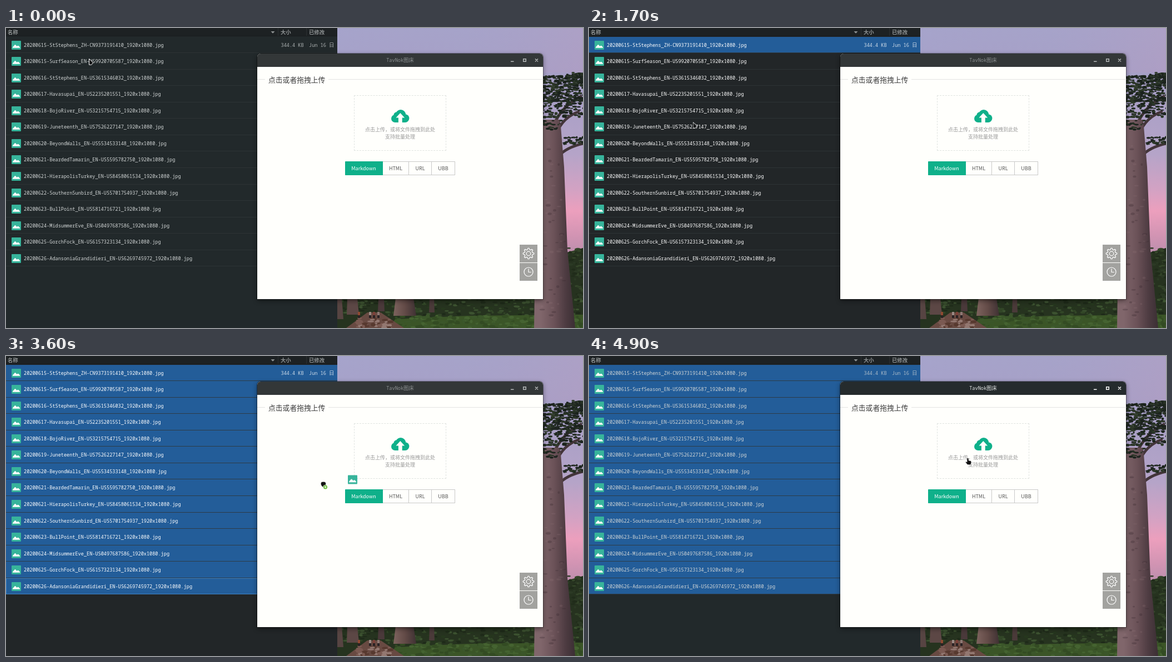
These frames come from a looping animation (1038x540 px, 8000 ms). An HTML page with a canvas:

```html
<!DOCTYPE html>
<html lang="zh-CN">
<head>
<meta charset="utf-8">
<title>拖拽上传</title>
<style>
  :root {
    --mono: 8.57px "Noto Sans Mono", "Noto Sans CJK SC", monospace;
    --green: #0fb08a;
  }
  html, body { margin: 0; width: 100%; height: 100%; overflow: hidden; background: #22292b; }
  #stage { position: relative; width: 1038px; height: 540px; overflow: hidden; }
  #stage * { box-sizing: border-box; }
  #stage canvas, #stage svg, .abs { position: absolute; left: 0; top: 0; white-space: pre; }
  .anim, .row { animation: 8s step-end -8ms infinite; }
  .han { font-size: 9.35px; line-height: 0; }

  /* file list */
  #list {
    width: 596px; height: 540px; overflow: hidden;
    font: var(--mono);
    animation-name: list-focus;
  }
  #head {
    width: 596px; height: 15px;
    background: #1d2123; color: #909495;
    font: 700 9.35px/14px "Noto Sans CJK SC", sans-serif;
    border-bottom: 1px solid #191c1e;
  }
  .rule { width: 1px; height: 14px; background: #2b2f31; }
  .row {
    position: absolute; left: 0; width: 596px; height: 29.57px; line-height: 31px; white-space: pre;
    border-bottom: 1px solid rgba(48, 54, 56, .85);
    animation-name: select-rest;
  }
  .row:nth-child(2) { animation-name: select-first; }
  .row svg { left: 10px !important; top: 7px !important; }
  .dim { opacity: .78; }
  #ring {
    top: 400px; width: 596px; height: 29px;
    border: 1px solid #3f83c4; animation-name: ring;
  }

  /* upload window */
  #win {
    left: 452px; top: 46px; width: 514px; height: 442px;
    background: #fffffc; border-radius: 6px 6px 0 0;
    box-shadow: 0 0 0 1px rgba(0,0,0,.35), 0 3px 9px rgba(0,0,0,.45);
    font: 9px "Noto Sans CJK SC", "Noto Sans", sans-serif;
  }
  #bar {
    width: 514px; height: 24px; text-align: center;
    border-radius: 6px 6px 0 0;
    font: var(--mono); line-height: 25px;
    animation-name: bar-focus;
  }
  #controls { animation-name: controls-focus; }
  #legend { left: 20px; top: 36.6px; font-size: 12.8px; line-height: 20px; font-weight: 300; color: #3c3c3c; }
  #drop {
    left: 174px; top: 75px; width: 166px; height: 100px; padding-top: 54px;
    border: 1px dashed #dfe3df; color: #999; text-align: center; line-height: 13px;
  }
  #tabs { left: 158px; top: 194px; display: flex; line-height: 23px; color: #555; text-align: center; }
  #tabs span { height: 25px; border: 1px solid #c9c9c9; border-left: 0; }
  #tabs .on { background: var(--green); border-color: var(--green); color: #fff; border-radius: 1px 0 0 1px; }
  #tabs span:last-child { border-radius: 0 1px 1px 0; }

  /* pointers */
  #arrow { animation-name: arrow; }
  #fist { animation-name: fist; }
  #file { animation-name: file; }
  #badge { animation-name: badge; }
  #plus { animation-name: plus; }
  #finger { animation-name: finger; }

  @keyframes list-focus {
    0% { background-color: #22292b; color: #d3d7d7; }
    10% { background-color: #222628; color: #fff; }
    57.5% { background-color: #222628; color: #fff; animation-timing-function: steps(3); }
    61.25%, 100% { background-color: #22292b; color: #d3d7d7; }
  }
  @keyframes bar-focus {
    0% { background-color: #333738; color: #8d9192; }
    57.5% { background-color: #333738; color: #8d9192; animation-timing-function: steps(3); }
    61.25%, 100% { background-color: #252b2d; color: #e6e8e8; }
  }
  @keyframes controls-focus {
    0% { color: #b6b9b9; }
    57.5% { color: #b6b9b9; animation-timing-function: steps(3); }
    61.25%, 100% { color: #fff; }
  }
  @keyframes select-first { 0% { background-color: transparent; } 10%, 100% { background-color: #235d99; } }
  @keyframes select-rest { 0% { background-color: transparent; } 33.75%, 100% { background-color: #235d99; } }
  @keyframes ring { 0% { opacity: 0; } 37.5% { opacity: 1; } 57.5%, 100% { opacity: 0; } }

  @keyframes arrow {
    0% { transform: translate(149px, 55px); opacity: 1; }
    2.5% { transform: translate(149px, 55px); animation-timing-function: steps(3); }
    6.25% { transform: translate(139px, 38px); }
    13.75% { transform: translate(139px, 38px); animation-timing-function: steps(4); }
    18.75% { transform: translate(185px, 109px); }
    20% { transform: translate(185px, 109px); animation-timing-function: steps(2); }
    22.5% { transform: translate(188px, 229px); }
    23.75% { transform: translate(188px, 229px); animation-timing-function: steps(7); }
    32.5% { transform: translate(181px, 420px); opacity: 1; }
    37.5%, 100% { transform: translate(181px, 420px); opacity: 0; }
  }
  @keyframes fist {
    0% { transform: translate(178px, 418px); opacity: 0; }
    37.5% { transform: translate(178px, 418px); opacity: 1; }
    38.75% { transform: translate(186px, 432px); }
    40% { transform: translate(225px, 430px); }
    41.25% { transform: translate(310px, 390px); }
    42.5% { transform: translate(410px, 330px); }
    43.75% { transform: translate(500px, 270px); }
    45% { transform: translate(566px, 226px); }
    46.25% { transform: translate(606px, 207px); }
    47.5% { transform: translate(632px, 197px); }
    48.75% { transform: translate(648px, 189px); }
    50% { transform: translate(660px, 185px); }
    52.5% { transform: translate(677px, 181px); opacity: 1; }
    57.5%, 100% { transform: translate(677px, 181px); opacity: 0; }
  }
  @keyframes file {
    0% { transform: translate(200px, 436px); opacity: 0; }
    38.75% { transform: translate(230px, 440px); opacity: 1; }
    40% { transform: translate(315px, 400px); }
    41.25% { transform: translate(415px, 345px); }
    42.5% { transform: translate(505px, 285px); }
    43.75% { transform: translate(570px, 240px); }
    45% { transform: translate(615px, 214.5px); }
    46.25% { transform: translate(636px, 205px); }
    47.5% { transform: translate(648px, 198px); }
    48.75% { transform: translate(660px, 194px); }
    50% { transform: translate(670px, 192px); }
    52.5% { transform: translate(682px, 188px); opacity: 1; }
    57.5%, 100% { transform: translate(682px, 188px); opacity: 0; }
  }
  @keyframes badge { 0% { opacity: 1; } 47.5%, 100% { opacity: 0; } }
  @keyframes plus { 0% { opacity: 0; } 47.5%, 100% { opacity: 1; } }
  @keyframes finger { 0% { opacity: 0; } 57.5%, 100% { opacity: 1; } }
</style>
</head>
<body>
<div id="stage">
  <canvas id="photo" width="1038" height="540"></canvas>

  <div id="list" class="abs anim">
    <div id="head" class="abs">
      <span class="abs" style="left:3px">名称</span>
      <span class="abs" style="left:494px">大小</span>
      <span class="abs" style="left:545px">已修改</span>
      <i class="abs rule" style="left:489px"></i>
      <i class="abs rule" style="left:540px"></i>
      <svg width="490" height="14"><path d="M476.5 6h7l-3.5 3.7z" fill="#909495"/></svg>
    </div>
  </div>
  <div id="ring" class="abs anim"></div>

  <div id="win" class="abs">
    <div id="bar" class="abs anim">TavNok<span class="han">图床</span></div>
    <div id="legend" class="abs">点击或者拖拽上传</div>
    <div id="drop" class="abs">点击上传，或将文件拖拽到此处
支持批量处理</div>
    <div id="tabs" class="abs"><span class="on" style="width:68px">Markdown</span><span style="width:47px">HTML</span><span style="width:41px">URL</span><span style="width:42px">UBB</span></div>
  </div>

  <svg width="1038" height="540" fill="none">
    <defs>
      <g id="image">
        <rect width="17" height="16" rx="1" fill="#37b49b"/>
        <path d="M2 12.8V11.5L5.6 7.4Q6.5 6.4 7.4 7.4L9.6 10 10.8 9Q11.6 8.4 12.4 9L15 11.6V12.8z" fill="#fff"/>
      </g>
    </defs>
    <path d="M452 92.5h14M580 92.5h386" stroke="#e4e4e2"/>
    <g id="controls" class="anim" stroke="currentColor" stroke-width="1.4">
      <path d="M908 60.3h5.5M930.7 55.7h4.6v4.6h-4.6zM952 55.5l5 5m0-5l-5 5"/>
    </g>
    <g transform="translate(693 147)">
      <g fill="#0fb08a">
        <circle cx="7" cy="16" r="7"/>
        <circle cx="9.5" cy="9.5" r="5"/>
        <circle cx="17" cy="9.2" r="9.2"/>
        <circle cx="25" cy="15.6" r="7.4"/>
        <path d="M7 12h18v11H7z"/>
      </g>
      <path d="M16.3 6l7.8 8.4h-4.4V23h-6.8v-8.6H8.5z" fill="#fffffc"/>
    </g>
    <path d="M924 390h32v32h-32zM924 423h32v32h-32z" fill="#a2a29f"/>
    <g stroke="#fff" stroke-width="1.2" stroke-linejoin="round">
      <path id="gear"/>
      <circle cx="940" cy="406" r="3.8"/>
      <circle cx="940" cy="439" r="8"/>
      <path d="M940 433.5v6h5"/>
    </g>

    <g id="file" class="anim"><use href="#image"/></g>
    <g id="fist" class="anim">
      <path d="M1 1.5Q2 0 4 .6Q6-.4 7.5.8Q9.5 1 9.4 3.5V6Q9 9 6.5 9.4H3.5Q1.5 8.5.8 6Q-.2 3.5 1 1.5z" fill="#111" stroke="#fff" stroke-width=".5"/>
      <g id="badge" class="anim">
        <circle cx="8.5" cy="10" r="3.8" fill="#5cb52c" stroke="#e3f2d4" stroke-width=".8"/>
        <path d="M8.5 8v4M6.5 10h4" stroke="#fff" stroke-width="1.2"/>
      </g>
      <g id="plus" class="anim">
        <path d="M7 7v6.4M3.8 10.2h6.4" stroke="#222" stroke-width="2.6"/>
        <path d="M7 7.6v5.2M4.4 10.2h5.2" stroke="#fff" stroke-width="1.2"/>
      </g>
    </g>
    <g id="arrow" class="anim">
      <path d="M.5.5V11.2H4.6Q7 9.6 7.6 6.8z" fill="#17191a" stroke="#fff" stroke-linejoin="round"/>
    </g>
    <g id="finger" class="anim">
      <path d="M680 184.5Q681.5 182.5 683 184.5V188L686.5 188.8Q688.2 189.4 687.8 191.5L686.8 195.7H681L677.6 191.7Q677 190 678.6 190.2L680 191z" fill="#111" stroke="#fff" stroke-width=".6"/>
    </g>
  </svg>
</div>

<script>
  const $ = id => document.getElementById(id);
  const ctx = $('photo').getContext('2d');

  const files = [
    '15-StStephens_ZH-CN9373191410', '15-SurfSeason_EN-US9920705587',
    '16-StStephens_EN-US3615346032', '17-Havasupai_EN-US2235201551',
    '18-BojoRiver_EN-US3215754715', '19-Juneteenth_EN-US7526227147',
    '20-BeyondWalls_EN-US5534533148', '21-BeardedTamarin_EN-US5595782750',
    '21-HierapolisTurkey_EN-US8458061534', '22-SouthernSunbird_EN-US5701754937',
    '23-BullPoint_EN-US5814716721', '24-MidsummerEve_EN-US0497687586',
    '25-GorchFock_EN-US6157323134', '26-AdansoniaGrandidieri_EN-US6269745972'
  ];
  const cell = (x, text, cls = '') => `<span class="abs ${cls}" style="left:${x}px">${text}</span>`;
  const details = cell(494.5, '344.4 KB', 'dim') + cell(545, 'Jun 16 <span class="han">日</span>', 'dim');
  $('list').insertAdjacentHTML('beforeend', files.map((name, i) =>
    `<div class="row" style="top:${15.5 + i * 29.57}px">` +
    '<svg width="17" height="16"><use href="#image"/></svg>' +
    cell(32, `202006${name}_1920x1080.jpg`) + (i ? '' : details) +
    '</div>').join(''));

  // Eight teeth, four corners each.
  let gear = '';
  for (let i = 0; i < 32; i++) {
    const a = (i - .5) * Math.PI / 16, r = i % 4 < 2 ? 9.8 : 7.2;
    gear += (i ? 'L' : 'M') + (940 + r * Math.cos(a)).toFixed(2) + ' ' + (406 + r * Math.sin(a)).toFixed(2);
  }
  $('gear').setAttribute('d', gear + 'z');

  let seed = 7;
  const rnd = () => (seed = seed * 16807 % 2147483647) / 2147483647;

  function poly(color, ...p) {
    ctx.fillStyle = color;
    ctx.beginPath();
    for (let i = 0; i < p.length; i += 2) ctx.lineTo(p[i], p[i + 1]);
    ctx.fill();
  }
  function leaves(n, x, y, w, h, colors, r = 3) {
    for (let i = 0; i < n; i++) {
      ctx.fillStyle = colors[i % colors.length];
      ctx.beginPath();
      ctx.ellipse(x + rnd() * w, y + rnd() * h, r * (.6 + rnd()), r * (.3 + rnd() * .5), 0, 0, 7);
      ctx.fill();
    }
  }
  function gradient(x0, y0, x1, y1, ...stops) {
    const g = ctx.createLinearGradient(x0, y0, x1, y1);
    stops.forEach(([at, c]) => g.addColorStop(at, c));
    return g;
  }

  function paintPhoto() {
    const sky = gradient(0, 0, 0, 540, [0, '#a6a4ca'], [.2, '#a79fc6'], [.42, '#b5a4c8'],
      [.54, '#d3a2c3'], [.61, '#ec9fbd'], [.7, '#cf93b2'], [.8, '#a98aa8']);
    poly(sky, 595, 0, 1038, 0, 1038, 540, 595, 540);
    poly(gradient(595, 0, 1038, 0, [0, 'rgba(165,163,205,.3)'], [.5, 'rgba(165,155,195,.1)'], [1, 'rgba(188,152,188,.3)']),
      595, 0, 1038, 0, 1038, 80, 595, 80);

    // undergrowth and grass
    poly('#26331f', 595, 480, 1038, 480, 1038, 540, 595, 540);
    poly('#26321f', 1005, 405, 1038, 396, 1038, 490, 1005, 490);
    leaves(90, 1010, 396, 30, 95, ['#202c1a', '#35462a', '#2b3924']);
    leaves(260, 595, 484, 443, 34, ['#1e2a19', '#324627', '#26371e', '#3c5230']);
    poly('#3b5527', 700, 524, 830, 518, 1038, 516, 1038, 540, 690, 540);
    leaves(200, 700, 518, 338, 22, ['#334b23', '#456331', '#3b562a'], 4);

    // dirt road
    poly('#684a42', 650, 512, 674, 512, 716, 540, 612, 540);
    leaves(40, 632, 522, 62, 18, ['#937871', '#57392f', '#7b5a52'], 4);

    // far trunks
    const bark = gradient(697, 0, 738, 0, [0, '#7d635e'], [.5, '#634b47'], [1, '#3f3133']);
    poly('#574442', 596, 486, 604, 486, 607, 524, 596, 524);
    poly('#5c4745', 614, 486, 632, 486, 635, 516, 613, 516);
    poly('#4a393a', 670, 486, 680, 486, 681, 510, 669, 510);
    poly(bark, 701, 486, 733, 486, 738, 518, 697, 518);
    poly('#4a3a39', 762, 486, 770, 486, 771, 512, 761, 512);
    [[635, '#8f4a31'], [655, '#9b8a85'], [662, '#7d4038'], [670, '#8d7874']].forEach(([x, c]) => {
      poly(c, x - 2, 511, x + 2, 511, x + 2, 517, x - 2, 517);
      poly('#2a2224', x - 2, 517, x + 2, 517, x + 2, 522, x - 2, 522);
    });

    // big tree
    ctx.strokeStyle = '#43353a';
    ctx.lineWidth = 5;
    ctx.beginPath();
    [[985, 175, 1000, 140, 1036, 122], [990, 190, 1002, 160, 1032, 150], [995, 230, 1008, 215, 1038, 208]]
      .forEach(([a, b, c, d, e, f]) => { ctx.moveTo(a, b); ctx.quadraticCurveTo(c, d, e, f); });
    ctx.stroke();
    poly(gradient(962, 0, 1022, 0, [0, '#80666b'], [.4, '#6b5258'], [.75, '#4d3b41'], [1, '#3d3035']),
      955, 165, 997, 165, 1004, 250, 1010, 400, 1024, 540, 950, 540);
    leaves(50, 964, 200, 40, 330, ['rgba(55,40,46,.3)', 'rgba(150,122,126,.2)'], 3);
    const dark = ['#1a221c', '#242f23', '#2e3929', '#1f2621'];
    leaves(300, 962, 86, 78, 46, dark);
    leaves(110, 962, 128, 78, 34, dark);
    leaves(40, 1008, 80, 32, 10, dark, 2.5);
    leaves(45, 1004, 196, 36, 14, dark, 2.5);
    leaves(24, 964, 165, 36, 18, dark, 2.5);
  }
  paintPhoto();
</script>
</body>
</html>
```
